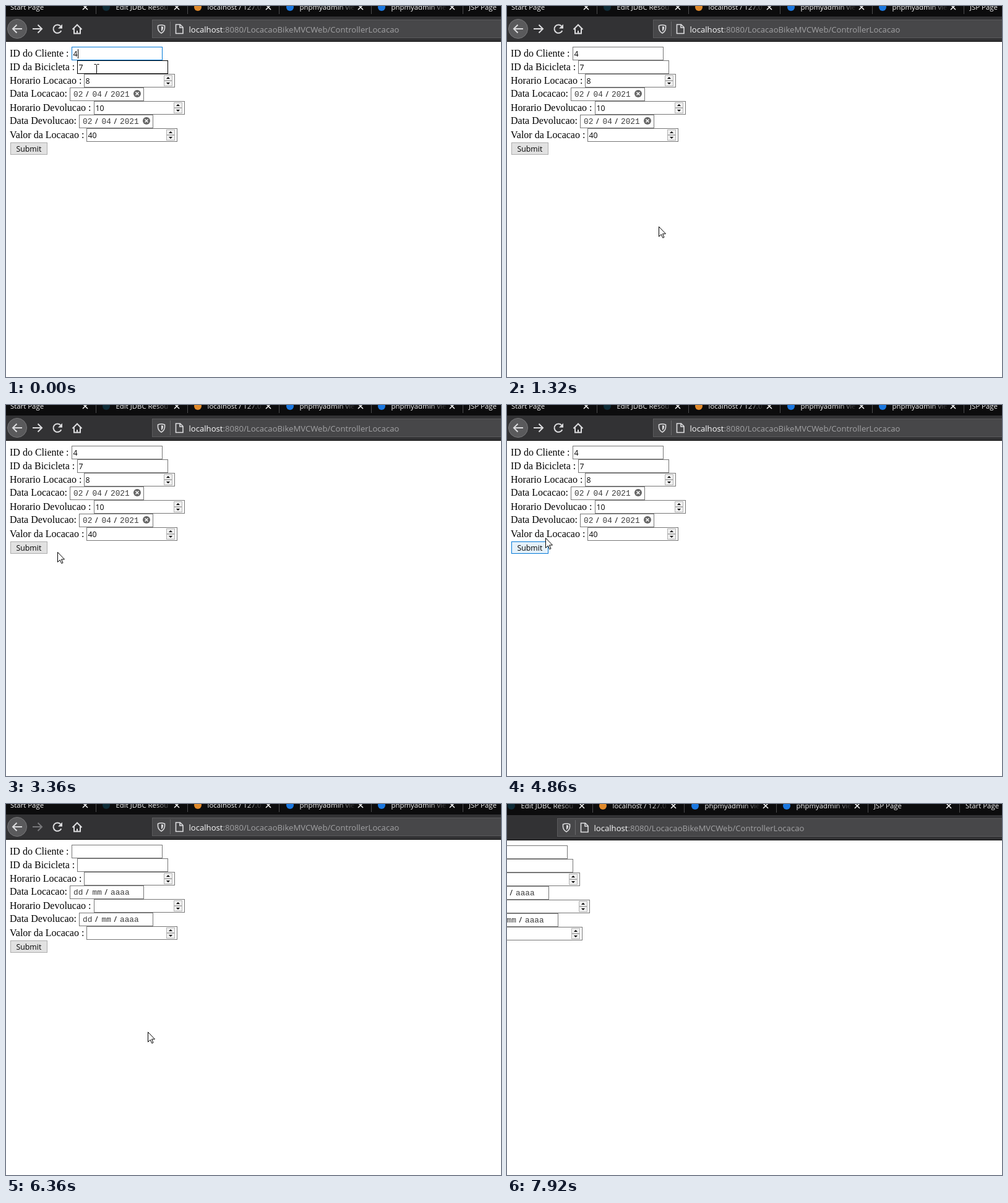
Animation, 800 px wide and 601 px high, one loop 8 s. Source, as an HTML page:

```html
<!DOCTYPE html>
<html lang="pt">
<head>
<meta charset="utf-8">
<title>Locacao</title>
<style>
html, body { margin: 0; width: 100%; height: 100%; overflow: hidden; background: #fff; }
svg { display: block; width: 800px; height: 601px; }
text { white-space: pre; }
.label { font: 16px "Liberation Serif", serif; }
.ui { font: 12.3px "Open Sans", sans-serif; }
.mono { font: 12.8px "Liberation Mono", monospace; fill: #3c3c3c; }
.tab { font: 11.4px "Open Sans", sans-serif; fill: #f4f4f5; }
.url { font: 13.13px "Open Sans", sans-serif; fill: #a2a2a4; }
.icon { fill: none; stroke: #dcdcde; stroke-width: 2; }
.thin { stroke-width: 1.6; }
.box { fill: #fff; stroke: #767676; }
.box.hover { stroke: #000; }
.box.focus { stroke: #0078d7; }
.btn { fill: #e1e1e1; stroke: #adadad; }
.btn.hover { fill: #e5f1fb; stroke: #0078d7; }
</style>
</head>
<body>
<svg viewBox="0 0 800 601">
  <defs>
    <linearGradient id="fade">
      <stop offset="0" stop-color="#0c0c0d" stop-opacity="0"/>
      <stop offset="1" stop-color="#0c0c0d"/>
    </linearGradient>
  </defs>
  <g id="win">
    <rect y="-5" width="1100" height="22" fill="#0c0c0d"/>
    <g id="tabs"></g>
    <rect y="17" width="1100" height="40" fill="#323234"/>
    <rect y="57" width="1100" height="1" fill="#0c0c0d"/>
    <circle cx="18" cy="37" r="15.5" fill="#5a5a5c" stroke="#767678"/>
    <path class="icon" d="M26 37H11M17.5 30.5L11 37L17.5 43.5"/>
    <path class="icon" id="fwd" d="M43 37H58M51.5 30.5L58 37L51.5 43.5"/>
    <path class="icon" d="M89.3 40A6.7 6.7 0 1 1 88 32.4"/>
    <path d="M91 29.5V36.5H84Z" fill="#dcdcde"/>
    <path class="icon" d="M107.5 38L115 30.5L122.5 38M110 36.5V44.5H120V36.5M115 44.5V40"/>
    <rect x="236.5" y="22.5" width="820" height="29" fill="#474749" stroke="#5a5a5c"/>
    <path class="icon thin" d="M245.5 32Q251 29.5 256.5 32V36Q256 41.5 251 44Q246 41.5 245.5 36Z"/>
    <path d="M251 33Q253 33 254 33.8V36Q253.6 39.5 251 41Z" fill="#dcdcde"/>
    <path d="M265.5 25V49" stroke="#68686a"/>
    <path class="icon thin" d="M275 30H281.5L286 34.5V44.5H274.5V30ZM281 30V35H286"/>
    <text class="url" x="295.5" y="43"><tspan fill="#f9f9fa">localhost</tspan>:8080/LocacaoBikeMVCWeb/ControllerLocacao</text>
    <g id="form"></g>
    <path id="line" d="M115 88.5H262" stroke="#0078d7"/>
    <path id="caret" d="M116.5 70V85" stroke="#000"/>
  </g>
  <path id="arrow" d="M.5 .5V16.5L4.2 13L6.8 18.6L9 17.6L6.5 12H11.5Z" fill="#fff" stroke="#000"/>
  <path id="beam" d="M-3.5 -7.5H-.5L.5 -6.5L1.5 -7.5H4.5M.5 -6.5V6.5M-3.5 7.5H-.5L.5 6.5L1.5 7.5H4.5" fill="none" stroke="#000"/>
</svg>
<script>
const $ = id => document.getElementById(id);
const show = (el, on) => el.setAttribute('visibility', on ? 'visible' : 'hidden');
const move = (el, x, y) => el.setAttribute('transform', `translate(${x} ${y})`);
const txt = (cls, x, y, s) => `<text class="${cls}" x="${x}" y="${y}">${s}</text>`;

// Tabs share one pitch; those with an icon have their title pushed right and faded.
const TAB = 148.2;
const tabs = [
  ['Start Page'],
  ['Edit JDBC Resou', '#0e2c38'],
  ['localhost / 127.0.', '#e08a2c'],
  ['phpmyadmin vie', '#1b78e0'],
  ['phpmyadmin vie', '#1b78e0'],
  ['JSP Page'],
  ['Start Page']
];

function tab([name, color], i) {
  const x = Math.round(i * TAB), end = x + 128;
  const icon = color ? `<circle cx="${x + 14}" cy="2" r="6" fill="${color}"/>` : '';
  const cover = color ? `<rect x="${end - 36}" y="-5" width="28" height="22" fill="url(#fade)"/>
    <rect x="${end - 8}" y="-5" width="24" height="22" fill="#0c0c0d"/>` : '';
  return icon + txt('tab', x + (color ? 29.5 : 7), 6, name) + cover +
    `<path d="M${end - 4} -2l8 8m0 -8l-8 8" stroke="#f4f4f5" stroke-width="1.6"/>
     <path d="M${end + 17.5} -5V13" stroke="#4c4c4e"/>`;
}
$('tabs').innerHTML = tabs.map(tab).join('');

// label, field x, kind, value
const rows = [
  ['ID do Cliente :', 106, 'text', '4'],
  ['ID da Bicicleta :', 115, 'text', '7'],
  ['Horario Locacao :', 126, 'num', '8'],
  ['Data Locacao:', 103, 'date', '02/04/2021'],
  ['Horario Devolucao :', 142, 'num', '10'],
  ['Data Devolucao:', 118, 'date', '02/04/2021'],
  ['Valor da Locacao :', 130, 'num', '40']
].map(([label, x, kind, value], i) =>
  ({ label, x, kind, value, y: 66 + 22 * i, w: kind === 'date' ? 120 : 147 }));

function spinner(x, y) {
  const half = (top, dir) =>
    `<rect x="${x + .5}" y="${top + .5}" width="13" height="8" fill="#f0f0f0" stroke="#b4b4b4"/>
     <path d="M${x + 4} ${top + 4.5 + 1.5 * dir}h6l-3 ${-3 * dir}z"/>`;
  return half(y, 1) + half(y + 9, -1);
}

function date(x, y, value) {
  const [d, m, a] = value.split('/');
  return txt('mono', x + 6, y, d) + txt('ui', x + 26, y, '/') + txt('mono', x + 36.5, y, m) +
    txt('ui', x + 56.5, y, '/') + txt('mono', x + 66, y, a);
}

function field({ label, x, y, w, kind, value }) {
  const isDate = kind === 'date';
  const base = y + (isDate ? 15 : 16);
  const frame = txt('label', 6, base, label) +
    `<rect class="box" x="${x + .5}" y="${y + .5}" width="${w - 1}" height="21"/>`;
  if (!isDate)
    return frame + (kind === 'num' ? spinner(x + 129, y + 2) : '') +
      `<g class="full">${txt('ui', x + 2.5, base, value)}</g>`;
  return frame +
    `<g class="full">${date(x, base, value)}
      <circle cx="${x + 109}" cy="${y + 10}" r="6" fill="#666"/>
      <path d="M${x + 106.5} ${y + 7.5}l5 5m0 -5l-5 5" stroke="#fff" stroke-width="1.5"/></g>
     <g class="blank">${date(x, base, 'dd/mm/aaaa')}</g>`;
}

$('form').innerHTML = rows.map(field).join('') +
  '<rect class="btn" x="7.5" y="221.5" width="59" height="19"/>' + txt('ui', 16.5, 236, 'Submit');

const boxes = [...document.querySelectorAll('.box')];
const btn = document.querySelector('.btn');
const full = document.querySelectorAll('.full');
const blank = document.querySelectorAll('.blank');

// Pointer strokes: start, end, steps, bend, goal. Each begins where the last one ended.
const home = [146, 102];
const strokes = [
  [120, 1050, 8, [189, 180], [192, 199]],
  [1200, 2160, 8, [280, 610], [519, 253]],
  [2280, 3240, 8, [300, 320], [30, 225]],
  [3360, 4030, 6, [220, 270], [52, 228]],
  [4860, 5820, 8, [91, 168], [140, 226]],
  [5940, 6360, 4, [170, 320], [229, 369]],
  [6640, 6790, 2, [244, 434], [215, -30]],
  [7350, 7920, 5, [199, -7], [206, -16]]
];

function progress(t, from, to, steps) {
  const gap = (to - from) / (steps - 1);
  return t < from ? 0 : Math.min(1, (Math.floor((t - from + 20) / gap) + 1) / steps);
}

const curve = (a, b, c, u) =>
  a.map((v, i) => Math.round((1 - u) ** 2 * v + 2 * u * (1 - u) * b[i] + u * u * c[i]));

const pointer = t => strokes.reduce((pos, [from, to, steps, bend, goal]) =>
  curve(pos, bend, goal, progress(t, from, to, steps)), home);

function draw(t) {
  const [x, y] = pointer(t);
  const slide = progress(t, 7350, 7920, 5);
  move($('win'), Math.round(-155 * slide ** 3.15), Math.floor(slide));

  const over = rows.findIndex(r => x >= r.x && x < r.x + r.w && y >= r.y && y < r.y + 22);
  boxes.forEach((b, i) => {
    b.classList.toggle('hover', i === over);
    b.classList.toggle('focus', i === 0 && t < 270);
  });
  btn.classList.toggle('hover', x >= 7 && x < 67 && y >= 214 && y < 241);
  show($('line'), t >= 270 && t < 1050);
  show($('caret'), t < 270);

  const sent = t >= 6080;
  full.forEach(g => show(g, !sent));
  blank.forEach(g => show(g, sent));
  $('fwd').style.stroke = sent ? '#77777a' : '';

  const typing = over >= 0 && rows[over].kind !== 'date';
  show($('arrow'), !typing);
  show($('beam'), typing);
  move($('arrow'), x, y);
  move($('beam'), x, y);
}

const start = performance.now();
function tick() {
  draw((performance.now() - start) % 8000);
  requestAnimationFrame(tick);
}
tick();
</script>
</body>
</html>
```
